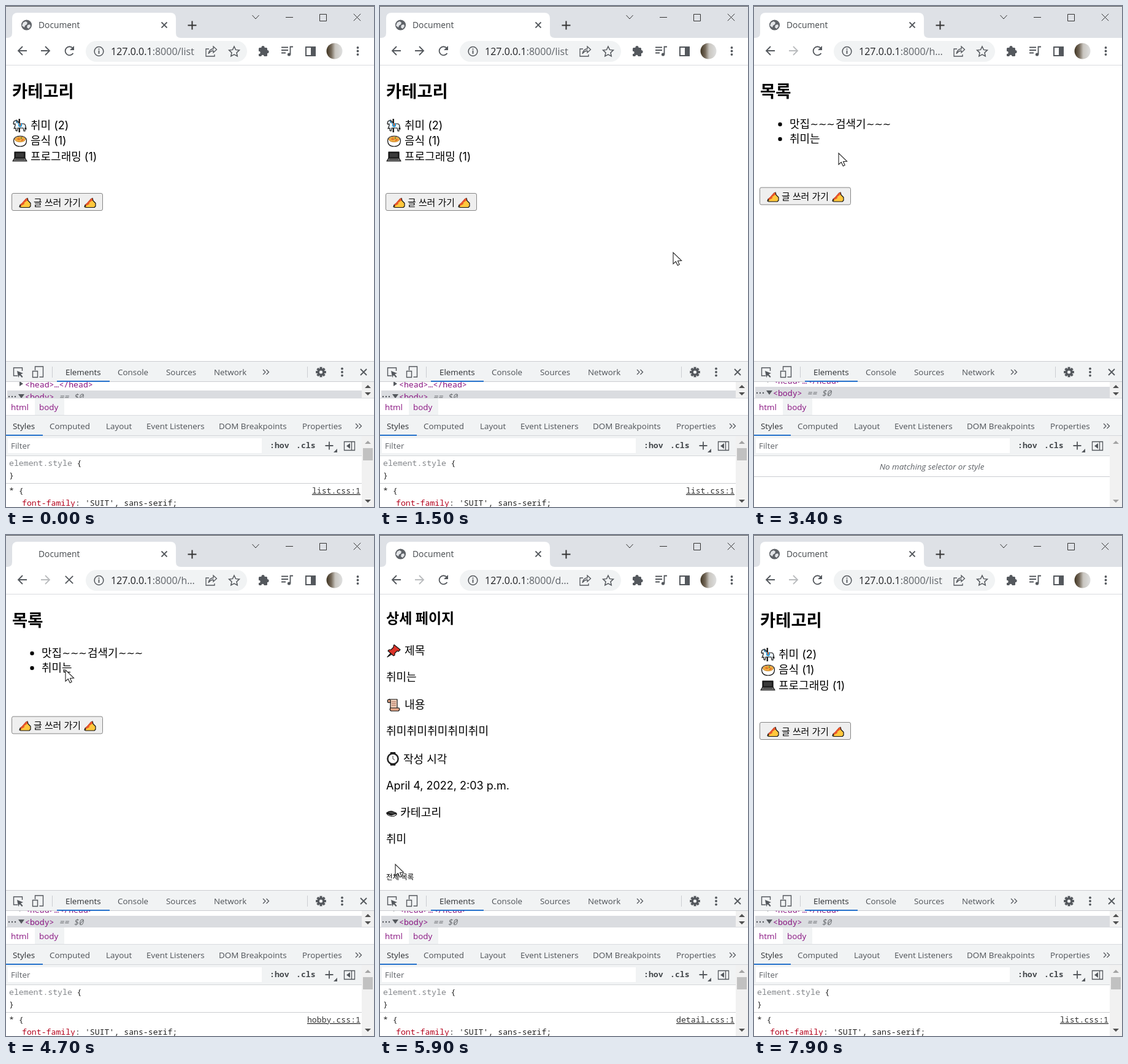
An HTML page that plays this animation: 600x817 px, repeating every 8 s.

```html
<!DOCTYPE html>
<html lang="ko">
<head>
<meta charset="utf-8">
<style>
html, body { margin: 0; width: 100%; height: 100%; overflow: hidden; background: #fff; }
svg { display: block; width: 100vw; height: 100vh; }
.ui { font-family: "Open Sans", "Noto Sans", sans-serif; }
.page { font-family: Inter, "Noto Sans CJK KR", "Noto Sans CJK", sans-serif; }
.mono { font-family: "Noto Sans Mono", "DejaVu Sans Mono", monospace; }
.line { fill: none; stroke: #54585d; stroke-width: 1.8; }
.thin { fill: none; stroke: #333; stroke-width: 1; }
</style>
</head>
<body>
<svg id="stage" viewBox="0 0 600 817"></svg>
<script>
const LOOP = 8000, STEP = 100;
const stage = document.getElementById('stage');
const byId = id => document.getElementById(id);

const text = (cls, x, y, size, str, more = '') =>
  `<text class="${cls}" x="${x}" y="${y}" font-size="${size}" ${more}>${str.replace(/</g, '&lt;')}</text>`;
const ui = (x, y, str, fill = '#4d5156', size = 13.4, more = '') => text('ui', x, y, size, str, `fill="${fill}" ${more}`);
const ko = (x, y, size, str, more) => text('page', x, y, size, str, more);
const mono = (x, y, str, fill, more = '') => text('mono', x, y, 13.2, str, `fill="${fill}" ${more}`);
const rect = (x, y, w, h, fill, more = '') => `<rect x="${x}" y="${y}" width="${w}" height="${h}" fill="${fill}" ${more}/>`;
const path = (d, fill, more = '') => `<path d="${d}" fill="${fill}" ${more}/>`;
const line = (d, cls = 'line', more = '') => `<path d="${d}" class="${cls}" ${more}/>`;
const dot = (x, y, r, fill, more = '') => `<circle cx="${x}" cy="${y}" r="${r}" fill="${fill}" ${more}/>`;
const dots = (x, y, gap) => [-gap, 0, gap].map(d => dot(x, y + d, 1.9, '#54585d')).join('');
const cross = (x, y, r) => `M${x - r} ${y - r}l${2 * r} ${2 * r}m0 ${-2 * r}l${-2 * r} ${2 * r}`;
const group = (id, body, more = '') => `<g id="${id}" ${more}>${body}</g>`;
const at = (x, y, body) => `<g transform="translate(${x} ${y})">${body}</g>`;
const ink = 'stroke="#111" stroke-width="1.2" stroke-linejoin="round"';

// Small pictures, each drawn from its own top left corner
const horse = path('M9.500 0h2.500v22h-2.500z', '#222') +
  path('M1 8l1-4 4-2 3 3 1 3h7q4 0 4 5l1 4-2-2v5l-2 0-1-5H8l-1 5-2-1 0-4-3 1 2-5V8L2 9z', '#eef6fb', ink) +
  path('M9 7h6v5l-3 2-3-2z', '#2f9bd6') + path('M11 7h2v4h-2z', '#d8602c') + path('M5 2l3 3 0 3-3-3z', '#2b6f9c');
const bowl = path('M.500 8q0 10 10.500 10t10.500-10q-1-7-10.500-7T.500 8z', '#fff', ink) +
  '<ellipse cx="11" cy="6.500" rx="8.500" ry="4.200" fill="#f2b043" stroke="#c9852b"/>' +
  path('M5 6l4-2 3 2-3 2z', '#e0792a') + path('M12 8l4-2 1 1-3 2z', '#d9541e') + dot(13, 4.5, 1.2, '#638c2b');
const laptop = rect(3, 0, 17, 10, '#1d1d1d', ink) + rect(5, 2, 13, 6.5, '#3a3a3a') +
  path('M3 10h17l3 5H0z', '#777', ink) + line('M4 12h15', 'thin', 'style="stroke:#222"');
const hand = path('M6 9l6-7 2-1 1 4 4 4 0 5-2 2H3l-2-1 1-3z', '#ffc83d', ink) +
  path('M2 12L11 2l3-1 0 4-6 6-6 3z', '#e8542a') + path('M1 15l1-3 2 2z', '#222') +
  path('M8 9l5-4 2 1-4 4z', '#ffc83d');
const pin = path('M8 13l-7 8 9-6z', '#777', ink) + path('M12 1l10 8-3 3-2-1-4 4 0 3-2 1-9-8 2-2 3 0 4-4 0-2z', '#dc3328', ink);
const scroll = path('M4 1h13v15H6V6H2q-2-4 2-5z', '#f3d3bd', ink) +
  line('M8 5h7M8 8h7M8 11h7', 'thin', 'style="stroke:#9b5944"') +
  path('M4 1q3 1 2 5H2q-2-4 2-5z', '#e5a788', ink) + path('M6 15h14q2 3-1 5H7q-3-2-1-5z', '#e5a788', ink);
const watch = path('M6 0h8l1 5H5zM5 17h10l-1 5H6z', '#222') +
  dot(10, 11, 8.6, '#fff', 'stroke="#222" stroke-width="2.500"') + line('M10 6v5l3 2', 'thin');
const box = path('M0 4q5-4 10-3l7 3q2 3-2 5-3 2-7 1-7-1-8-6z', '#151515') +
  path('M3 4q4-3 7-2l5 2q-2 2-5 2z', '#444') + path('M2 6q5 3 8 2l6-2v1q-3 3-7 2-5 0-7-3z', '#eee');

const button = y => rect(9.5, y, 148, 28, '#efefef', 'rx="2.500" stroke="#858585"') +
  at(21, y + 7, hand) + ko(45, y + 20, 14.9, '글 쓰러 가기') + at(127, y + 7, hand);

const listPage = ko(10, 148.5, 27.4, '카테고리', 'font-weight="700"') +
  at(11, 184, horse) + ko(40, 200.5, 18, '취미 (2)') +
  at(12, 211, bowl) + ko(40, 226, 18, '음식 (1)') +
  at(11, 238, laptop) + ko(40, 251.5, 18, '프로그래밍 (1)') + button(305.5);

const tildes = x => `<text x="${x}" y="198" font-size="16" font-family="DejaVu Sans, sans-serif">~~~</text>`;
const hobbyPage = ko(10, 148.5, 27.4, '목록', 'font-weight="700"') +
  dot(42.5, 193, 3.2, '#000') + ko(58, 199, 18, '맛집') + tildes(91.5) + ko(133, 199, 18, '검색기') + tildes(183) +
  dot(42.5, 217, 3.2, '#000') + ko(58, 223, 18, '취미는') + button(296);

const detailPage = ko(10, 144, 23, '상세 페이지', 'font-weight="700"') +
  at(11, 178, pin) + ko(40, 195, 18.2, '제목') + ko(10, 238, 18, '취미는') +
  at(11, 267, scroll) + ko(40, 283, 18.2, '내용') + ko(10, 326, 18.2, '취미취미취미취미취미') +
  at(11, 354, watch) + ko(38, 371.5, 18, '작성 시각') + ko(10, 415, 18, 'April 4, 2022, 2:03 p.m.') +
  at(10, 449, box) + ko(33, 459, 18.3, '카테고리') + ko(10, 502, 18, '취미') + ko(10, 562, 11.4, '전체 목록');

const globe = dot(33.5, 31, 8.6, '#5f6368') +
  path('M28 27l4-2 3 2-1 3-3 2-1 3-4-3zM35 31l4-1 1 3-3 4-3-2z', '#e4e6e9');
const browser = rect(0, 0, 600, 52, '#dee1e6') + rect(0, 0, 600, 1, '#55585c') +
  path('M2 52q8 0 8-8V20q0-9 9-9H268q9 0 9 9V44q0 8 8 8z', '#fff') +
  group('globe', globe) + ui(53, 36, 'Document', '#45494d', 13.8) +
  line(cross(258, 31, 4.5)) + line('M296.500 31.500h14m-7-7v14', 'line', 'style="stroke:#333;stroke-width:2"') +
  line('M401.500 15l5.500 6 5.500-6M456 18.500h12M511.500 13.500h11v11h-11z' + cross(572.5, 18.5, 5.7), 'thin') +
  rect(0, 96, 600, 1, '#dadce0') +
  line('M34 73H20m7-7l-7 7 7 7') + group('forward', line('M57 73h14m-7-7l7 7-7 7', '', 'fill="none" stroke-width="1.800"')) +
  group('reload', line('M109.500 77a7 7 0 1 1-.800-8.500') + path('M111 65v7h-7z', '#54585d')) +
  group('stop', line(cross(103, 73, 6.2))) +
  rect(130, 57, 263, 34, '#f1f3f4', 'rx="17"') +
  dot(151.5, 74, 7.4, 'none', 'stroke="#54585d" stroke-width="1.500"') + line('M151.500 72.500v5.500m0-8.500v1.800') +
  ui(171, 79.5, '', '#5f6368', 16, 'id="url"') +
  line('M331 70h-5v12h14v-3M330 78c1-5 4-8 8-8v-4l5.500 5-5.500 5v-3c-4 0-6 2-8 5z', 'line', 'style="stroke-width:1.300"') +
  line('M372 66l2.500 5.400 5.900.7-4.400 4 1.200 5.800-5.200-2.900-5.200 2.900 1.200-5.800-4.400-4 5.900-.7z', 'line', 'style="stroke-width:1.500"') +
  rect(412, 68, 14, 14, '#54585d', 'rx="1.500"') + dot(419, 67.5, 2.6, '#54585d') + dot(426, 74.5, 2.6, '#54585d') +
  dot(412.5, 76, 2.2, '#fff') + dot(418.5, 82, 2.2, '#fff') +
  line('M449 67.500h11M449 72h11M449 76.500h7M463.500 79V66.500h4.500') + dot(461.5, 79, 2.6, '#54585d') +
  rect(489, 67, 15, 14, 'none', 'stroke="#54585d" stroke-width="2"') + rect(497, 67, 7, 14, '#54585d') +
  dot(535.5, 73.5, 13, 'url(#shade)') + dots(573.5, 73.5, 5.6);

const tabs = (y, list) => list.map(([x, s], i) => ui(x, y, s, i ? '#4d5156' : '#2b2e31')).join('');
const chevrons = (x, y) => line(`M${x - 5} ${y - 4}l4 4-4 4m5.500-8l4 4-4 4`, 'line', 'style="stroke-width:1.300"');
const teeth = [0, 45, 90, 135].map(a => rect(-2, -8.3, 4, 16.6, '#54585d', `transform="rotate(${a})"`)).join('');
const devtools = rect(0, 579, 600, 34, '#f1f3f4') + rect(0, 579, 600, 1, '#cbcdd1') +
  line('M19 603h-6.500v-13h14v5', 'line', 'style="stroke-width:1.400"') + path('M18 595l10 4-4 1.500 3.500 4-1.500 1.500-3.800-4-2 4z', '#54585d') +
  line('M47.500 594v-6h13v17h-6M43.500 595.500h8v10h-8z', 'line', 'style="stroke-width:1.400"') +
  rect(75, 588, 1, 18, '#cbcdd1') + tabs(602, [[97, 'Elements'], [182, 'Console'], [261, 'Sources'], [339, 'Network']]) +
  chevrons(424, 597) + rect(491, 588, 1, 18, '#cbcdd1') +
  at(513.5, 597, teeth + dot(0, 0, 6, '#54585d') + dot(0, 0, 2.6, '#f1f3f4')) + dots(548, 597, 5.6) + line(cross(583, 597, 5)) +
  `<g clip-path="url(#treeBox)">${rect(0, 613, 600, 27, '#fff')}${group('tree',
    rect(2, 621, 578, 20, '#dadce0') + path('M22 606v8l6-4z', '#54585d') + mono(31, 616, '<head>…</head>', '#881280') +
    [5, 10, 15].map(x => dot(x, 631, 1.2, '#54585d')).join('') + path('M20 627h10l-5 7z', '#54585d') +
    mono(31, 636, '<body>', '#881280') + mono(86.5, 636, '== $0', '#6b6e72', 'font-style="italic"'))}</g>` +
  rect(0, 612, 600, 1, '#cbcdd1') + rect(83, 611, 86, 2, '#2672cc') +
  rect(580, 613, 20, 26, '#f1f1f1') + path('M585 623h10l-5-5zM585 630h10l-5 5z', '#505050') +
  rect(0, 639, 600, 1, '#dadce0') + rect(47, 640, 48, 27, '#f1f3f4') +
  ui(8, 659, 'html', '#881280') + ui(54, 659, 'body', '#881280') +
  rect(0, 667, 600, 66, '#f1f3f4') + rect(0, 667, 600, 1, '#dadce0') + rect(0, 700, 600, 1, '#d4d6da') +
  tabs(690, [[11, 'Styles'], [71, 'Computed'], [163, 'Layout'], [229, 'Event Listeners'], [347, 'DOM Breakpoints'], [483, 'Properties']]) +
  rect(0, 699, 60, 2, '#2672cc') + chevrons(575, 685) +
  rect(3, 705, 414, 24, '#fff') + ui(8, 722, 'Filter', '#5f6368') +
  mono(430, 721, ':hov', '#44484c', 'font-weight="700"') + mono(473, 721, '.cls', '#44484c', 'font-weight="700"') +
  line('M520.500 717h13m-6.500-6.500v13') + path('M540 722v6h-6z', '#54585d') +
  line('M551.500 710.500h17v14h-17zM563.500 710v14', 'line', 'style="stroke-width:1.300"') + path('M561 713v9l-6-4.500z', '#54585d') +
  rect(0, 733, 600, 1, '#d4d6da') + rect(580, 701, 20, 116, '#f1f1f1');

const styles = mono(5, 750, 'element.style', '#83868a') + mono(115.5, 750, '{', '#222') + mono(5, 770, '}', '#222') +
  rect(0, 778, 580, 1, '#cbcdd1') + mono(5, 795, '* {', '#222') +
  mono(578, 795, '', '#333', 'id="sheet" text-anchor="end" text-decoration="underline"') +
  mono(26, 815, 'font-family', '#b3001b') + mono(113.1, 815, ": 'SUIT', sans-serif;", '#222') +
  rect(582, 721, 16, 20, '#c1c1c1') + path('M585 714h10l-5-5z', '#a3a3a3') + path('M585 805h10l-5 5z', '#505050');
const empty = ui(290, 756, 'No matching selector or style', '#5f6368', 13.4, 'font-style="italic" text-anchor="middle"') +
  rect(0, 767, 580, 1, '#cbcdd1') + path('M585 714h10l-5-5zM585 805h10l-5 5z', '#a3a3a3');

stage.innerHTML = `<defs><linearGradient id="shade"><stop stop-color="#3f3422"/><stop offset=".3" stop-color="#75695a"/>
  <stop offset=".55" stop-color="#c9c6c0"/><stop offset="1" stop-color="#dedfdf"/></linearGradient>
  <clipPath id="treeBox"><path d="M0 613h600v26H0z"/></clipPath></defs>` +
  rect(0, 0, 600, 817, '#fff') + browser + group('list', listPage) + group('hobby', hobbyPage) + group('detail', detailPage) +
  devtools + group('styles', styles) + group('empty', empty) +
  group('cursor', path('M0 0V18.500L4.300 14.700 7.300 21 10.200 19.600 7.500 13.800 13.600 13.400Z', '#fff', 'stroke="#222" stroke-width="1.100"'));

// Each visit: page, url, click time, page shown, styles shown
const visits = [
  ['list', '/list', -1, -1, -1],
  ['hobby', '/h…', 3200, 3300, 3500],
  ['detail', '/d…', 4600, 4800, 5000],
  ['list', '/list', 6400, 6500, 6600]
];
// Pointer stops: time, x, y
const route = [
  [1100, 590, 440], [1500, 478, 402], [2100, 330, 330], [2700, 75, 200], [3200, 62, 192], [3400, 138, 240],
  [3900, 140, 242], [4400, 97, 220], [4800, 97, 220], [5300, 60, 420], [5900, 25, 537], [6200, 30, 553],
  [6400, 30, 553], [6600, 367, 418], [6900, 590, 400]
];

const show = (id, on) => byId(id).style.display = on ? '' : 'none';

function moveCursor(t) {
  const i = route.findIndex(p => p[0] > t);
  show('cursor', i > 0);
  if (i < 1) return;
  const [t0, x0, y0] = route[i - 1], [t1, x1, y1] = route[i];
  const k = (t - t0) / (t1 - t0), e = k * k * (3 - 2 * k);
  byId('cursor').setAttribute('transform', `translate(${x0 + (x1 - x0) * e} ${y0 + (y1 - y0) * e})`);
}

function draw(t) {
  const n = visits.filter(v => t >= v[3]).length - 1;
  const [page, url, , , ready] = visits[n];
  const loading = visits.some(v => t >= v[2] && t < v[3]);
  for (const id of ['list', 'hobby', 'detail']) show(id, id === page);
  show('globe', !loading);
  show('reload', !loading);
  show('stop', loading);
  show('styles', t >= ready);
  show('empty', t < ready);
  byId('url').innerHTML = `<tspan fill="#202124">127.0.0.1</tspan>:8000${url}`;
  byId('sheet').textContent = page + '.css:1';
  byId('forward').setAttribute('stroke', n ? '#babcbe' : '#54585d');
  byId('tree').setAttribute('transform', `translate(0 ${n ? 0 : 6})`);
  moveCursor(t);
}

const start = performance.now();
function tick() {
  const t = (performance.now() - start) % LOOP;
  draw(Math.floor(t / STEP) * STEP);
  requestAnimationFrame(tick);
}
tick();
</script>
</body>
</html>
```
